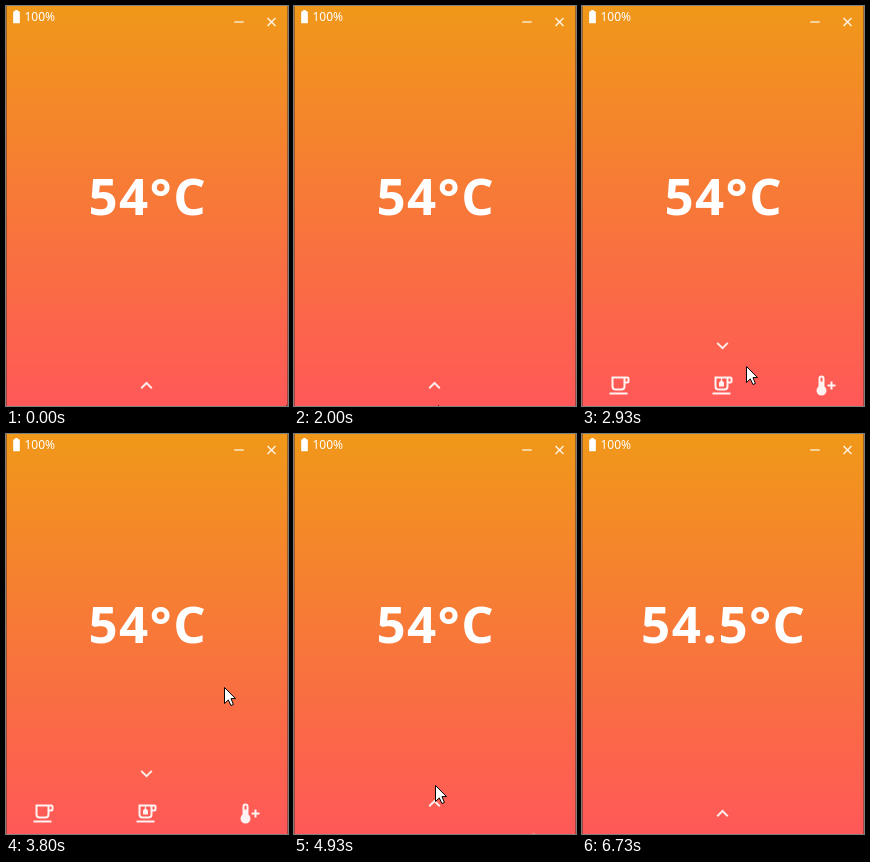
Recreate the animation shown at these times as an HTML page with a canvas. Size 282 by 400 pixels, loop 8000 ms.

```html
<!DOCTYPE html>
<html lang="en">
<head>
<meta charset="utf-8">
<title>Mug temperature</title>
<style>
  html, body { margin: 0; width: 100%; height: 100%; overflow: hidden; }
  canvas, svg { position: absolute; left: 0; top: 0; width: 282px; height: 400px; }
  text { fill: #fff; font-family: "Noto Sans", "Open Sans", sans-serif; }
  #temp { font-size: 51px; font-weight: 700; letter-spacing: .03em; text-anchor: middle; }
  #charge { font-size: 12px; }
</style>
</head>
<body>
<canvas id="stage" width="282" height="400"></canvas>
<svg viewBox="0 0 282 400">
  <text id="charge" x="18.5" y="15">100%</text>
  <text id="temp" x="141.8" y="209">54°C</text>
</svg>
<script>
const W = 282, H = 400, LOOP = 8000, FPS = 15;
const OPEN = 41, CLOSE = 73, WARMER = 101; // ticks of 1/15 s
const ctx = document.getElementById('stage').getContext('2d');
const temp = document.getElementById('temp');

// Icons on a 24 px grid
const cup = 'M2 21V19H20V21ZM20 8V5H18V8ZM20 3A2 2 0 0 1 22 5V8A2 2 0 0 1 20 10H18V13A4 4 0 0 1 14 17H8A4 4 0 0 1 4 13V3ZM16 5H6V13A2 2 0 0 0 8 15H14A2 2 0 0 0 16 13Z';
const icon = {
  chevron: new Path2D('M12 8L6 14L7.4 15.4L12 10.8L16.6 15.4L18 14Z'),
  cup: new Path2D(cup),
  tea: new Path2D(cup + 'M10.4 5H11.6V7L13.5 9V13H8.5V9L10.4 7Z'),
  heat: new Path2D('M11 13V5A3 3 0 0 0 5 5V13A5 5 0 1 0 11 13ZM8 4A1 1 0 0 1 9 5V8H7V5A1 1 0 0 1 8 4ZM19 8H17V11H14V13H17V16H19V13H22V11H19Z'),
  battery: new Path2D('M10 2H14V4H15.7Q17 4 17 5.3V20.7Q17 22 15.7 22H8.3Q7 22 7 20.7V5.3Q7 4 8.3 4H10Z'),
  minus: new Path2D('M5 11H19V13H5Z'),
  cross: new Path2D('M6 6L18 18M18 6L6 18'),
  arrow: new Path2D('M.5 .5V16.5L4.3 12.9L6.9 18.5L9.4 17.5L7 11.6H11.5Z')
};

// Pointer stops: tick, x, y; below the bottom edge it is out of view
const stops = [
  [0, 280, 399], [3, 280, 399], [5, 263, 394], [8, 242, 400],
  [29, 144, 400], [30, 144, 399], [37, 140, 378], [40, 140, 378],
  [44, 164, 360], [48, 218, 253], [57, 218, 253], [66, 135, 349],
  [70, 139, 338], [CLOSE, 139, 338], [78, 148, 402]
];

const clamp = v => Math.max(0, Math.min(1, v));
const easeOut = v => 1 - (1 - v) ** 2;
const white = a => `rgba(255,255,255,${a})`;

function pointer(tick) {
  const i = stops.findIndex(s => s[0] > tick);
  if (i < 0) return [0, H];
  const [t0, x0, y0] = stops[i - 1], [t1, x1, y1] = stops[i];
  const k = (tick - t0) / (t1 - t0);
  return [Math.round(x0 + (x1 - x0) * k), Math.round(y0 + (y1 - y0) * k)];
}

// Draws an icon around its centre
function put(path, x, y, { size = 24, flip = 1, line = 0 } = {}) {
  const s = size / 24;
  ctx.save();
  ctx.translate(x, y);
  ctx.scale(s, s * flip);
  ctx.translate(-12, -12);
  ctx.lineWidth = line;
  if (line) ctx.stroke(path);
  else ctx.fill(path, 'evenodd');
  ctx.restore();
}

function drawPointer(x, y) {
  ctx.save();
  ctx.translate(x, y);
  ctx.fillStyle = '#fff';
  ctx.strokeStyle = '#000';
  ctx.lineWidth = 1;
  ctx.fill(icon.arrow);
  ctx.stroke(icon.arrow);
  ctx.restore();
}

const sky = ctx.createLinearGradient(0, 0, 0, H);
sky.addColorStop(0, '#f09819');
sky.addColorStop(1, '#ff5858');

function render(ms) {
  // The small lead keeps rounded step times on their own tick
  const tick = Math.floor(ms * FPS / 1000 + 0.25);
  const phase = since => easeOut(clamp((tick - since + 1) / 4));
  const open = phase(OPEN) - phase(CLOSE);
  const lift = 40 * open;

  ctx.fillStyle = sky;
  ctx.fillRect(0, 0, W, H);
  ctx.fillStyle = 'rgba(60,40,40,.45)';
  ctx.fillRect(0, 0, 1, H);
  ctx.fillRect(W - 1, 0, 1, H);

  ctx.fillStyle = '#fff';
  put(icon.battery, 10.5, 10.7, { size: 16 });
  ctx.fillStyle = ctx.strokeStyle = white(.88);
  put(icon.minus, 233, 16, { size: 16 });
  put(icon.cross, 265.5, 16, { size: 16, line: 2.2 });

  const expanded = tick >= OPEN && tick < CLOSE;
  put(icon.chevron, 140.5, 379.6 - lift, { flip: expanded ? -1 : 1 });
  if (open > 0) {
    ctx.fillStyle = white(.92);
    [icon.cup, icon.tea, icon.heat].forEach((path, i) =>
      put(path, 37.5 + 103 * i, 419.6 - lift));
  }

  const [x, y] = pointer(tick);
  if (y < H) drawPointer(x, y);

  const label = tick >= WARMER ? '54.5°C' : '54°C';
  if (temp.textContent !== label) temp.textContent = label;
}

const start = performance.now();
function loop() {
  render((performance.now() - start) % LOOP);
  requestAnimationFrame(loop);
}
loop();
</script>
</body>
</html>
```
